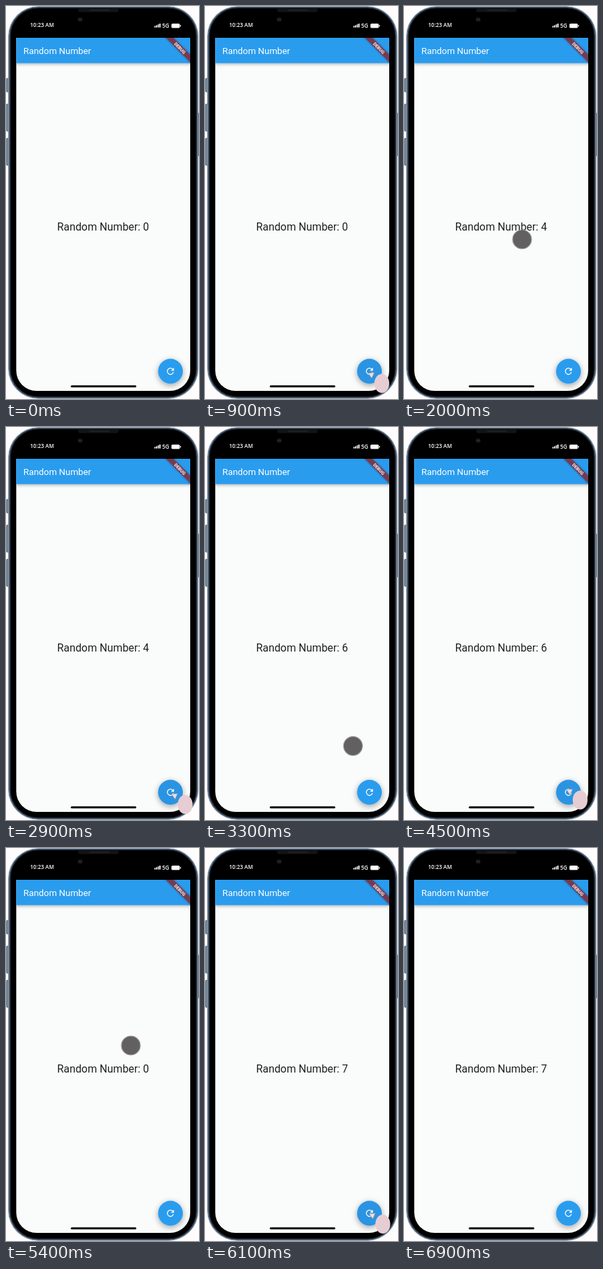
Animation, 286 px wide and 581 px high, one loop 7.4 s. Source, as an HTML page:

```html
<!DOCTYPE html>
<html lang="en">
<head>
<meta charset="utf-8">
<title>Random Number</title>
<style>
  html, body { margin: 0; width: 100%; height: 100%; overflow: hidden; background: #fefcfc; }
  svg { display: block; width: 100vw; height: 100vh; }
  text { font-family: Roboto, Arial, sans-serif; }
  .status text { font: 600 8px "Open Sans", "Noto Sans", sans-serif; }
</style>
</head>
<body>
<svg viewBox="0 0 286 581" xmlns="http://www.w3.org/2000/svg">
  <defs>
    <clipPath id="screen">
      <path d="M15.200 47H273V539a30 30 0 0 1-30 30H45.200a30 30 0 0 1-30-30z"/>
    </clipPath>
    <filter id="barShadow" x="-10%" y="-20%" width="120%" height="160%">
      <feDropShadow dx="0" dy="1.500" stdDeviation="2" flood-opacity=".3"/>
    </filter>
    <filter id="fabShadow" x="-60%" y="-60%" width="220%" height="220%">
      <feDropShadow dx="0" dy="2.500" stdDeviation="4.200" flood-opacity=".36"/>
    </filter>
    <filter id="ribbonShadow" x="-20%" y="-60%" width="140%" height="220%">
      <feDropShadow dx="0" dy="0" stdDeviation="1.400" flood-opacity=".42"/>
    </filter>
  </defs>

  <!-- phone body -->
  <g fill="#76879a" stroke="#36434f" stroke-width=".7">
    <rect x=".8" y="107" width="4" height="20" rx="1"/>
    <rect x=".8" y="145" width="4" height="40" rx="1"/>
    <rect x=".8" y="195.500" width="4" height="40" rx="1"/>
    <rect x="282" y="158" width="3.600" height="64" rx="1"/>
  </g>
  <rect x="3.700" y=".8" width="281" height="579.400" rx="44" fill="#53657a" stroke="#8d9cb0" stroke-width="1"/>
  <rect x="6.300" y="2.800" width="275.800" height="575.200" rx="41.500" fill="#000" stroke="#202b38" stroke-width="1.400"/>
  <rect x="107" y="3.600" width="60" height="5.400" rx="2.400" fill="#131315"/>
  <rect x="123" y="5.200" width="30" height="1.800" rx=".9" fill="#222224"/>
  <circle cx="110" cy="20" r="3.600" fill="#131519"/>
  <circle cx="108.500" cy="20" r="1" fill="#34363c"/>
  <circle cx="111.300" cy="20" r="1" fill="#34363c"/>

  <!-- status bar -->
  <g class="status" fill="#fff">
    <text x="35.800" y="31">10:23 AM</text>
    <rect x="219.800" y="29.500" width="1.700" height="2.200"/>
    <rect x="222.300" y="28.500" width="1.700" height="3.200"/>
    <rect x="224.800" y="27.200" width="1.700" height="4.500"/>
    <rect x="227.300" y="26" width="1.700" height="5.700"/>
    <text x="231.500" y="31.600">5G</text>
    <rect x="245.200" y="26" width="12.300" height="6.600" rx="1.600"/>
    <rect x="258" y="28" width="1.200" height="2.600" rx=".6"/>
  </g>

  <!-- app -->
  <g clip-path="url(#screen)">
    <rect x="15" y="46" width="259" height="525" fill="#fafbfb"/>
    <rect x="15" y="46" width="259" height="38.500" fill="#2c9cee" filter="url(#barShadow)"/>
    <text x="25.800" y="71" font-size="13.300" fill="#fff">Random Number</text>
    <g transform="translate(273 47) rotate(45)">
      <rect x="-30" y="17.600" width="60" height="7.900" fill="#753a51" filter="url(#ribbonShadow)"/>
      <text y="23.900" font-size="6.600" font-weight="700" fill="#fff" text-anchor="middle">DEBUG</text>
    </g>
    <text id="label" x="143.900" y="332.400" font-size="15.850" fill="#202023" text-anchor="middle"></text>
    <circle id="fab" cx="243.700" cy="540" r="18.400" fill="#2c9cee" filter="url(#fabShadow)"/>
    <path transform="translate(235.850 532.150) scale(.654)" fill="#fff"
      d="M17.650 6.350A8 8 0 1 0 19.730 14H17.650A6 6 0 1 1 16.220 7.780L13 11H20V4z"/>
    <rect x="96" y="560.800" width="97" height="3" rx="1.500" fill="#050505"/>
  </g>

  <!-- cursors -->
  <circle id="dot" r="14" fill="#636062" stroke="#9d9b9d" stroke-width="1.200"/>
  <g id="pointer">
    <ellipse cx="20.500" cy="16" rx="11" ry="14" fill="#e6cdd3"/>
    <path d="M0 .5L9.500 0L5.500 8.500z" fill="#ecdcdd" stroke="#85828d" stroke-width=".6"/>
  </g>
</svg>
<script>
const LOOP = 7400, STEP = 100;
const FAB = { x: 243.7, y: 540, r: 18.4 };
const $ = id => document.getElementById(id);
const label = $('label'), fab = $('fab'), dot = $('dot'), pointer = $('pointer');

// [time, value shown from then on]
const values = [[0, 0], [1400, 4], [3100, 6], [4700, 0], [6100, 7]];

// [time, x, y] of the cursor
const path = [
  [100, 300, 500], [500, 250, 545], [700, 250, 545], [900, 241.5, 542],
  [1500, 241.5, 542], [2000, 175, 345], [2200, 170, 337], [2700, 245, 542],
  [3100, 245, 542], [3600, 172, 342], [3800, 168, 354], [4300, 240.5, 535.5],
  [4800, 240.5, 535.5], [5200, 184, 302], [5400, 185, 292], [5900, 243, 540],
  [6200, 243, 540], [6600, 310, 560]
];

const ease = p => p * p * (3 - 2 * p);

function cursorAt(t) {
  const i = path.findIndex(k => k[0] > t);
  if (i < 1) return null;
  const [t0, x0, y0] = path[i - 1], [t1, x1, y1] = path[i];
  const p = ease((t - t0) / (t1 - t0));
  return { x: x0 + (x1 - x0) * p, y: y0 + (y1 - y0) * p };
}

function show(el, on, pos) {
  el.setAttribute('display', on ? 'inline' : 'none');
  if (on) el.setAttribute('transform', `translate(${pos.x} ${pos.y})`);
}

function draw(time) {
  const t = Math.floor((time % LOOP) / STEP) * STEP;
  const value = values.filter(v => v[0] <= t).pop()[1];
  label.textContent = 'Random Number: ' + value;

  const pos = cursorAt(t);
  const hover = !!pos && Math.hypot(pos.x - FAB.x, pos.y - FAB.y) < FAB.r;
  const onScreen = !!pos && pos.x < 273;
  show(dot, onScreen && !hover, pos);
  show(pointer, !!pos && (hover || !onScreen), pos);
  fab.setAttribute('fill', hover ? '#2b94e3' : '#2c9cee');
}

const start = performance.now();
function tick() {
  draw(performance.now() - start);
  requestAnimationFrame(tick);
}
tick();
</script>
</body>
</html>
```
